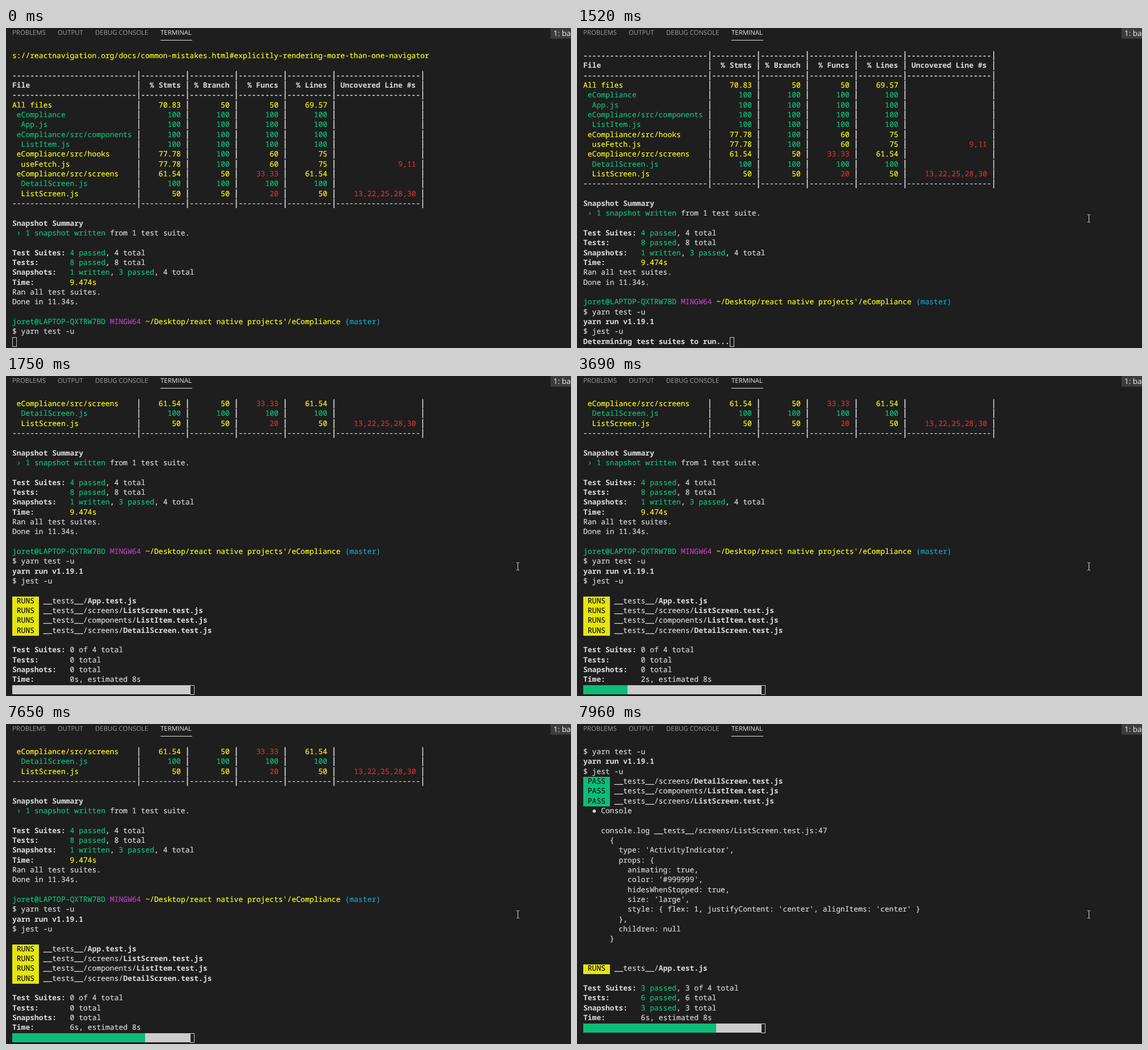
Animation of 995x563 px, one loop 8000 ms. Source, as an HTML page:

```html
<!DOCTYPE html>
<html lang="en">
<head>
<meta charset="utf-8">
<title>Terminal test run</title>
<style>
  html, body { margin: 0; width: 100%; height: 100%; overflow: hidden; background: #1e1e1e; }
  svg { display: block; }
  text { white-space: pre; text-rendering: geometricPrecision; }
  #rows text { font: 13.025px "Noto Sans Mono", monospace; font-variant-ligatures: none; stroke-width: .2; }
  #rows .bold { font-weight: 700; stroke-width: 0; }
  #rows .pipe { font: 16px "DejaVu Sans Mono", monospace; text-anchor: middle; }
  #rows rect { shape-rendering: crispEdges; }
  #tabs { font: 11.4px "Open Sans", sans-serif; fill: #9c9c9c; }
  #picker { font: 13.5px "Open Sans", sans-serif; fill: #f0f0f0; }
</style>
</head>
<body>
<svg width="995" height="563" viewBox="0 0 995 563">
  <rect width="995" height="563" fill="#1e1e1e"/>
  <g id="tabs">
    <text x="11" y="11.5">PROBLEMS</text>
    <text x="91" y="11.5">OUTPUT</text>
    <text x="157" y="11.5">DEBUG CONSOLE</text>
    <text x="272" y="11.5" fill="#e7e7e7">TERMINAL</text>
  </g>
  <rect x="272" y="21" width="56" height="1" fill="#e7e7e7"/>
  <rect x="959" width="36" height="19" fill="#3c3c3c"/>
  <text id="picker" x="964" y="13.5">1: ba</text>
  <g id="rows"></g>
  <rect id="caret" width="7" height="16" fill="none" stroke="#ccc"/>
  <path id="mouse" d="M-2.5-6.5h2m1 0h2M0-6v12M-2.5 6.5h2m1 0h2" fill="none" stroke="#ddd"/>
</svg>
<script>
const LOOP = 8000, ROWS = 30;
const LEFT = 11, TOP = 41.4, CELL = 7.815, LINE = 17.333, BASE = 11.5;
const GREEN = '#0dbc79', YELLOW = '#e5e510', DARK = '#111', PIPE = '#dcdcdc';

// A line is plain text with "§x" switching to style x.
const STYLES = {
  w: { fill: '#d8d8d8' },
  b: { fill: '#dcdcdc', bold: true },
  g: { fill: '#0fc07c' },
  y: { fill: '#fcfc14' },
  r: { fill: '#d23232' },
  m: { fill: '#bc3fbc' },
  c: { fill: '#11a8cd' },
  P: { fill: DARK, back: GREEN, height: LINE },
  R: { fill: DARK, back: YELLOW, height: LINE },
  G: { back: GREEN, height: 16 },
  W: { back: '#ccc', height: 16 }
};

const dashes = [28, 10, 10, 10, 10, 19].map(n => '-'.repeat(n) + '|').join('');
const grade = n => n === 100 ? 'g' : n < 50 ? 'r' : 'y';

function tableRow(name, stats, missed = '') {
  const cells = stats.map(n => `§${grade(n)}${String(n).padStart(9)} §w|`).join('');
  return `§${grade(stats[0])}${name.padEnd(28)}§w|${cells}§r${missed.padStart(18)} §w|`;
}

const full = [100, 100, 100, 100];
const hooks = [77.78, 100, 60, 75];
const LOG = [
  '§ys://reactnavigation.org/docs/common-mistakes.html#explicitly-rendering-more-than-one-navigator',
  '',
  '§b' + dashes,
  '§b' + 'File'.padEnd(28) + '|  % Stmts | % Branch |  % Funcs |  % Lines | Uncovered Line #s |',
  '§b' + dashes,
  tableRow('All files', [70.83, 50, 50, 69.57]),
  tableRow(' eCompliance', full),
  tableRow('  App.js', full),
  tableRow(' eCompliance/src/components', full),
  tableRow('  ListItem.js', full),
  tableRow(' eCompliance/src/hooks', hooks),
  tableRow('  useFetch.js', hooks, '9,11'),
  tableRow(' eCompliance/src/screens', [61.54, 50, 33.33, 61.54]),
  tableRow('  DetailScreen.js', full),
  tableRow('  ListScreen.js', [50, 50, 20, 50], '13,22,25,28,30'),
  dashes,
  '',
  '§bSnapshot Summary',
  '§g › 1 snapshot written§w from 1 test suite.',
  '',
  '§bTest Suites: §g4 passed§w, 4 total',
  '§bTests:       §g8 passed§w, 8 total',
  '§bSnapshots:   §g1 written§w, §g3 passed§w, 4 total',
  '§bTime:        §y9.474s',
  'Ran all test suites.',
  'Done in 11.34s.',
  '',
  "§gjoret@LAPTOP-QXTRW7BD §mMINGW64 §y~/Desktop/react native projects'/eCompliance §c(master)",
  '$ yarn test -u'
];
const YARN = '§byarn run v1.19.1', JEST = '$ jest -u';

const CONSOLE = `  ● Console

    console.log __tests__/screens/ListScreen.test.js:47
      {
        type: 'ActivityIndicator',
        props: {
          animating: true,
          color: '#999999',
          hidesWhenStopped: true,
          size: 'large',
          style: { flex: 1, justifyContent: 'center', alignItems: 'center' }
        },
        children: null
      }
`.split('\n');

const APP = '§bApp', LIST = 'screens/§bListScreen';
const ITEM = 'components/§bListItem', DETAIL = 'screens/§bDetailScreen';
const mark = (style, word) => file => `§${style} ${word} §w __tests__/${file}.test.js`;
const runs = mark('R', 'RUNS'), pass = mark('P', 'PASS');

function bar(sec) {
  return '§G' + ' '.repeat(5 * sec) + '§W' + ' '.repeat(40 - 5 * sec);
}

function status(files, sec, done = 0, tests = 0, snaps = 0) {
  const passed = n => n ? `§g${n} passed§w, ` : '';
  return [
    '', ...files.map(runs), '',
    `§bTest Suites: §w${passed(done)}${done} of 4 total`,
    `§bTests:       §w${passed(tests)}${tests} total`,
    `§bSnapshots:   §w${passed(snaps)}${snaps} total`,
    `§bTime:        §w${sec}s, estimated 8s`,
    bar(sec)
  ];
}

const all = [APP, LIST, ITEM, DETAIL];
const started = [YARN, JEST];
const printed = [...started, pass(DETAIL), pass(ITEM), pass(LIST), ...CONSOLE];

// [start time, lines after the log, caret column, blank lines below the caret]
const STEPS = [
  [0, [''], 0],
  [70, [YARN, ''], 0],
  [140, [...started, ''], 0],
  [1520, [...started, '§bDetermining test suites to run...'], 33],
  [1600, [...started, ''], 0],
  [1670, [...started, ...status([APP], 0)], 40],
  ...[1750, 2680, 3690, 4700, 5710, 6640, 7650].map(
    (at, sec) => [at, [...started, ...status(all, sec)], 40]),
  [7740, [...started, pass(DETAIL), ...status([APP, LIST, ITEM], 6, 1, 2, 1)], 40],
  [7810, [...started, pass(DETAIL), pass(ITEM), ...status([APP, LIST], 6, 2, 4, 2)], 40],
  [7890, [...printed, ...status([APP, LIST], 6, 2, 4, 2)], 40],
  [7960, [...printed, ...status([APP], 6, 3, 6, 3)], 40, 1]
];
const MOVES = [1060, 1140, 1210, 1290];

const $ = id => document.getElementById(id);
const lastAt = (times, t) => times.filter(at => at <= t).length - 1;
const escape = s => s.replace(/&/g, '&amp;').replace(/</g, '&lt;');
const colX = col => LEFT + col * CELL;
const rowY = row => TOP + row * LINE;

function textMarkup(x, y, text, fill, name) {
  return `<text x="${x}" y="${y}" fill="${fill}" stroke="${fill}" class="${name}">${escape(text)}</text>`;
}

function lineMarkup(line, row) {
  const y = rowY(row), base = Math.round(y + BASE);
  let col = 0, out = '';
  ('w' + line).split('§').forEach(part => {
    const style = STYLES[part[0]], text = part.slice(1);
    const from = col;
    col += text.length;
    if (style.back && text) {
      const l = Math.round(colX(from)), r = Math.round(colX(col));
      out += `<rect x="${l}" y="${y}" width="${r - l}" height="${style.height}" fill="${style.back}"/>`;
    }
    for (const { index } of text.matchAll(/\|/g)) {
      out += textMarkup(colX(from + index + 0.5), base, '|', PIPE, 'pipe');
    }
    const words = text.replace(/\|/g, ' ');
    if (words.trim()) {
      out += textMarkup(colX(from), base, words, style.fill, style.bold ? 'bold' : '');
    }
  });
  return out;
}

function drawScreen([, lines, col, below = 0]) {
  const view = [...LOG, ...lines, ...Array(below).fill('')].slice(-ROWS);
  $('rows').innerHTML = view.map(lineMarkup).join('');
  $('caret').setAttribute('x', Math.round(colX(col)) + 0.5);
  $('caret').setAttribute('y', Math.round(rowY(ROWS - 1 - below)) + 0.5);
}

function drawMouse(move) {
  const left = (1 - move / (MOVES.length - 1)) ** 2;
  $('mouse').style.display = move < 0 ? 'none' : '';
  $('mouse').setAttribute('transform', `translate(${901.5 + 22 * left} ${335 + 88 * left})`);
}

const stepTimes = STEPS.map(s => s[0]);
let shown = -1;

function render(t) {
  const step = lastAt(stepTimes, t);
  if (step !== shown) drawScreen(STEPS[shown = step]);
  drawMouse(lastAt(MOVES, t));
}

const start = performance.now();
function tick() {
  render((performance.now() - start) % LOOP);
  requestAnimationFrame(tick);
}
tick();
</script>
</body>
</html>
```
